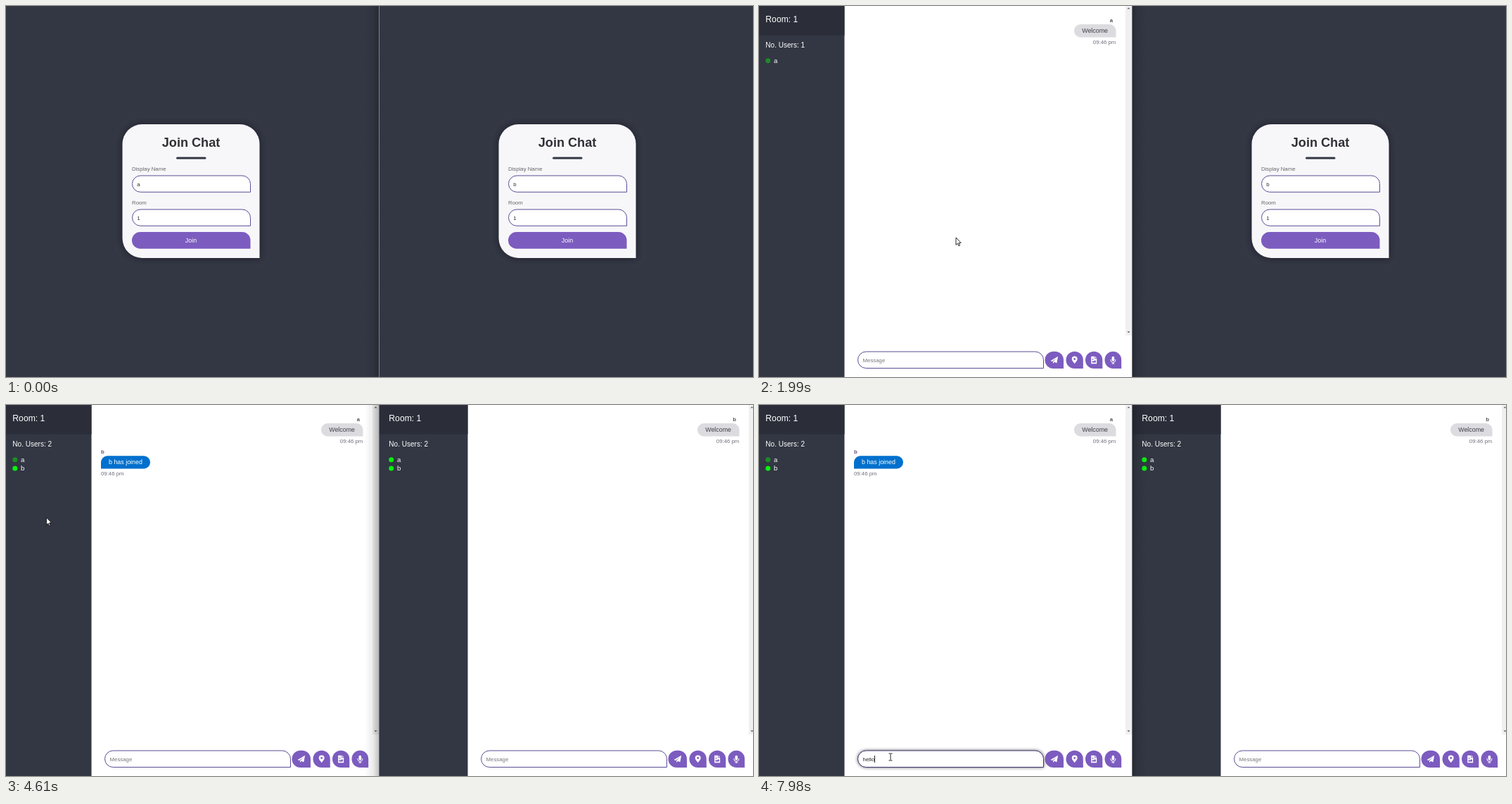
These frames come from a looping animation (1062 by 527 pixels, 8000 ms). An HTML page with a canvas:

```html
<!DOCTYPE html>
<html lang="en">
<head>
<meta charset="utf-8">
<title>Chat demo</title>
<style>
html, body { margin: 0; width: 100%; height: 100%; overflow: hidden; background: #323743; }
canvas { display: block; }
</style>
</head>
<body>
<canvas id="stage" width="1062" height="527"></canvas>
<script>
const ctx = document.getElementById('stage').getContext('2d');
const LOOP = 8000, PANEL = 535, DIVIDER = 530;
const SLATE = '#323743', PURPLE = '#7c5cbf', BORDER = '#5b4d94';
const JOIN_A = 1990, JOIN_B = 3340;

// Cursor stops: time, x, y
const PATH = [
  [70, 976, 514], [130, 760, 480], [200, 560, 452], [270, 455, 438], [330, 425, 434],
  [730, 425, 434], [930, 392, 395], [1190, 330, 275], [1260, 318, 269], [1460, 285, 315],
  [1590, 280, 329], [1990, 280, 329], [2190, 335, 322], [2590, 630, 302], [2990, 765, 325],
  [3130, 776, 337], [3270, 776, 337], [3400, 737, 319], [3600, 470, 215], [3900, 60, 95],
  [4050, 1, 77], [4270, 19, 94], [4610, 60, 164], [4850, 115, 330], [5140, 187, 500]
];

const TYPED = [[0, ''], [6200, 'h'], [6260, 'he'], [6460, 'hek'], [6860, 'he'],
               [7710, 'hel'], [7850, 'hell'], [7980, 'hello']];

const ARROW = new Path2D('M0 0V10.4L2.4 8.2L4 11.8L5.6 11.1L4 7.6H7.2Z');
const HAND = new Path2D('M5 1Q7 0 7.5 2V8Q10 7.5 10.5 9Q12.5 8.5 13 10Q15.5 9.5 16 11.5V16Q15.5 19 14 21H6.5Q5 18 1 13.5Q0 11.5 2 11.5Q3.5 12 4.5 13V2Q4.5 1 5 1Z');
const PLANE = new Path2D('M-5.3 1L5.3 -5.2L3.6 4.2L.2 2.8L-1.7 5.1V2.2L3 -2.7L-2.8 2Z');
const PIN = new Path2D('M0 5.3C-1.2 3 -4 .8 -4 -1.5A4 4 0 0 1 4 -1.5C4 .8 1.2 3 0 5.3ZM1.4 -1.5A1.4 1.4 0 1 0 -1.4 -1.5A1.4 1.4 0 1 0 1.4 -1.5Z');
const FILE = new Path2D('M-4 -5.2H1V-2H4V5.2H-4ZM1.7 -5.2L4 -2.8H1.7Z');

const clamp = v => Math.max(0, Math.min(1, v));
const last = (list, t) => list.filter(e => e[0] <= t).pop();

function text(str, x, y, size, color, align = 'left', weight = '') {
  ctx.font = `${weight} ${size}px "Liberation Sans", Arial, sans-serif`;
  ctx.fillStyle = color;
  ctx.textAlign = align;
  ctx.fillText(str, x, y);
}

function rect(x, y, w, h, color) {
  ctx.fillStyle = color;
  ctx.fillRect(x, y, w, h);
}

function bubble(x, y, w, h, r, fill, { stroke, glow = 0, blur = 5, dy = 0, left = false } = {}) {
  ctx.beginPath();
  ctx.roundRect(x, y, w, h, left ? [r, r, r, 0] : [r, r, 0, r]);
  ctx.save();
  if (glow) {
    ctx.shadowColor = `rgba(20,14,28,${glow})`;
    ctx.shadowBlur = blur;
    ctx.shadowOffsetY = dy;
  }
  ctx.fillStyle = fill;
  ctx.fill();
  ctx.restore();
  if (stroke) {
    ctx.strokeStyle = stroke;
    ctx.lineWidth = 1;
    ctx.stroke();
  }
}

function dot(x, y, r, color) {
  ctx.fillStyle = color;
  ctx.beginPath();
  ctx.arc(x, y, r, 0, 7);
  ctx.fill();
}

function drawJoin(name, hover) {
  rect(-5, 0, 540, 527, SLATE);
  bubble(165.5, 168, 195, 190, 28, '#f7f7fa', { glow: .65, blur: 11 });
  text('Join Chat', 263, 200, 18.1, '#322f36', 'center', 'bold');
  ctx.fillStyle = SLATE;
  ctx.beginPath();
  ctx.roundRect(242, 214.5, 42.5, 3, 1.5);
  ctx.fill();
  [['Display Name', name, 241], ['Room', '1', 289]].forEach(([label, value, y]) => {
    text(label, 179, y - 7.3, 7.8, '#66656d');
    bubble(179.5, y, 168, 23.3, 12, '#fff', { stroke: BORDER });
    text(value, 186.2, y + 14.6, 7.8, '#303036');
  });
  bubble(179, 321, 168.5, 23.8, 12, PURPLE, { glow: hover * .8 });
  text('Join', 263, 335.8, 8.9, '#fff', 'center');
}

function drawIcons() {
  ctx.fillStyle = '#fff';
  const at = (x, draw) => {
    ctx.save();
    ctx.translate(x, 503);
    draw();
    ctx.restore();
  };
  at(419.8, () => ctx.fill(PLANE));
  at(448.7, () => ctx.fill(PIN, 'evenodd'));
  at(476.2, () => {
    ctx.fill(FILE);
    ctx.fillStyle = PURPLE;
    ctx.fill(new Path2D('M-2.7 3.6V2.1L-1.5 .9L-.4 2L1.5 0L2.7 1.3V3.6Z'));
    dot(-1.6, -1.2, .9, PURPLE);
  });
  at(503.4, () => {
    ctx.beginPath();
    ctx.roundRect(-1.8, -5.3, 3.6, 7, 1.8);
    ctx.fill();
    ctx.strokeStyle = '#fff';
    ctx.lineWidth = 1;
    ctx.stroke(new Path2D('M-3.4 -1V0A3.4 3.4 0 0 0 3.4 0V-1M0 3.4V5M-1.9 5H1.9'));
  });
}

function drawChat(name, users, { joined, focus = 0, value = '', caret = false }) {
  rect(-5, 0, 540, 527, '#fff');
  rect(-5, 0, 126.5, 527, SLATE);
  rect(-5, 0, 126.5, 41.5, '#2b2e39');
  text('Room: 1', 9.3, 23.3, 12.2, '#fff');
  text('No. Users: ' + users.length, 9.3, 58.6, 10.05, '#fff');
  users.forEach(([user, color], i) => {
    dot(12.8, 77.7 + i * 12.3, 3.5, color);
    text(user, 21, 80.6 + i * 12.3, 9.6, '#fff');
  });

  rect(521, 0, 9.5, 468, '#f0f0f1');
  ctx.fillStyle = '#66666a';
  ctx.fill(new Path2D('M523.4 4.3L525.5 2.2L527.6 4.3ZM523.4 462.3L525.5 464.4L527.6 462.3Z'));

  text(name, 503, 23, 7.8, '#55505c', 'right', 'bold');
  bubble(448, 26, 59.5, 18.5, 9.2, '#dcdce0');
  text('Welcome', 477.6, 38, 8.9, '#403e47', 'center');
  text('09:46 pm', 507.3, 53.5, 7.8, '#706f7d', 'right');
  if (joined) {
    text('b', 135, 68.7, 7.8, '#6c4c78', 'left', 'bold');
    bubble(135, 72.3, 70, 18.2, 9.1, '#0070cd', { left: true });
    text('b has joined', 146, 84.4, 8.9, '#fff');
    text('09:46 pm', 135, 99.5, 7.8, '#706f7d');
  }

  bubble(140.5, 491, 264, 23.5, 12, '#fff', { stroke: focus ? '#40366c' : BORDER, glow: focus * .8 });
  text(value || 'Message', 147.6, 506, 7.8, value ? '#222226' : '#77767d');
  if (caret) rect(Math.round(147.7 + (value ? ctx.measureText(value).width : 0)), 498, 1, 10, '#222');
  [[406.5, 26.5], [436.5, 24.3], [464, 24.3], [491.5, 23.7]].forEach(
    ([x, w]) => bubble(x, 490.7, w, 24.2, 12, PURPLE));
  drawIcons();
}

function panel(x, from, to, draw) {
  ctx.save();
  ctx.beginPath();
  ctx.rect(from, 0, to - from, 527);
  ctx.clip();
  ctx.translate(x, 0);
  draw();
  ctx.restore();
}

function windowShadow(onLeft) {
  const end = DIVIDER + (onLeft ? -20 : 21);
  const shade = ctx.createLinearGradient(DIVIDER, 0, end, 0);
  shade.addColorStop(0, 'rgba(0,0,0,.24)');
  shade.addColorStop(.4, 'rgba(0,0,0,.08)');
  shade.addColorStop(1, 'rgba(0,0,0,0)');
  rect(Math.min(DIVIDER, end), 0, Math.abs(end - DIVIDER), 527, shade);
}

function cursorAt(t) {
  const step = Math.floor((t + 24) / 66.67) * 66.67 - 10;
  const time = Math.max(70, step);
  const i = PATH.findIndex(p => p[0] > time);
  if (i < 0) return PATH[PATH.length - 1].slice(1);
  const [t0, x0, y0] = PATH[i - 1], [t1, x1, y1] = PATH[i];
  const k = (time - t0) / (t1 - t0);
  return [x0 + (x1 - x0) * k, y0 + (y1 - y0) * k];
}

function cursorKind(x, y, t) {
  const right = x > DIVIDER;
  const px = right ? x - PANEL : x;
  if (t >= (right ? JOIN_B : JOIN_A)) return px > 140 && px < 405 && y > 491 && y < 515 ? 'text' : 'arrow';
  if (px < 179 || px > 348) return 'arrow';
  if (y > 321 && y < 345) return 'hand';
  return (y > 241 && y < 264) || (y > 289 && y < 312) ? 'text' : 'arrow';
}

function drawCursor(t) {
  const [x, y] = cursorAt(t);
  const kind = cursorKind(x, y, t);
  ctx.save();
  ctx.translate(x, y);
  ctx.fillStyle = '#fff';
  ctx.strokeStyle = '#111';
  ctx.lineJoin = 'round';
  ctx.lineWidth = .9;
  if (kind === 'text') {
    ctx.stroke(new Path2D('M-2.5 -5H-.6L0 -4.5L.6 -5H2.5M0 -4.5V4.5M-2.5 5H-.6L0 4.5L.6 5H2.5'));
  } else {
    if (kind === 'hand') {
      ctx.translate(-3.2, -.5);
      ctx.scale(.56, .6);
      ctx.lineWidth = 1.5;
    }
    const shape = kind === 'hand' ? HAND : ARROW;
    ctx.fill(shape);
    ctx.stroke(shape);
  }
  ctx.restore();
}

function caretVisible(t) {
  return (t >= 5200 && t < 5660) || (t >= 6200 && !(t >= 7510 && t < 7710));
}

function render(t) {
  const both = t >= JOIN_B;
  const lime = '#06f20b', green = '#1d8b27';
  panel(0, 0, DIVIDER, () => {
    if (t < JOIN_A) return drawJoin('a', clamp((t - 1500) / 160));
    drawChat('a', both ? [['a', green], ['b', lime]] : [['a', green]], {
      joined: both,
      focus: clamp((t - 5130) / 200),
      value: last(TYPED, t)[1],
      caret: caretVisible(t)
    });
  });
  panel(PANEL, DIVIDER, 1062, () => {
    if (both) drawChat('b', [['a', lime], ['b', lime]], {});
    else drawJoin('b', clamp((t - 2900) / 160));
  });
  windowShadow(t < 1850 || (t >= 3140 && t < 5140));
  rect(DIVIDER, 0, 1, 527, t < JOIN_A ? '#85868a' : '#737479');
  if (t >= 70) drawCursor(t);
}

function loop(now) {
  render(now % LOOP);
  requestAnimationFrame(loop);
}
render(0);
requestAnimationFrame(loop);
</script>
</body>
</html>
```
